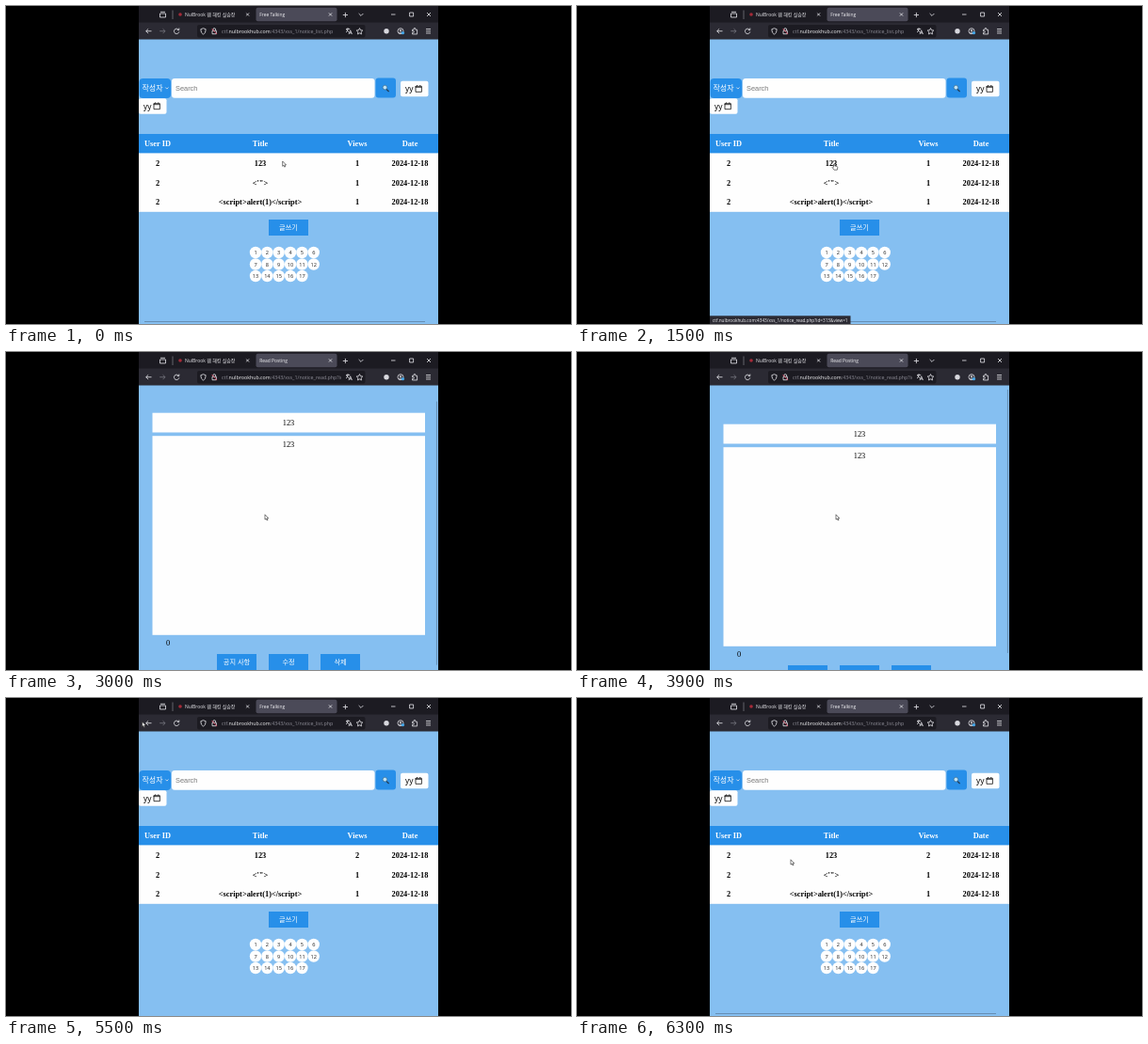
An HTML page that plays this animation: 600 by 338 pixels, repeating every 6400 ms.

```html
<!DOCTYPE html>
<html lang="ko">
<head>
<meta charset="utf-8">
<style>
html, body { margin: 0; width: 100%; height: 100%; overflow: hidden; background: #000; }
svg { display: block; width: 600px; height: 338px; }
text { font-family: 'Open Sans', 'Noto Sans CJK KR', 'Noto Sans CJK', sans-serif; white-space: pre; }
.serif { font-family: 'Liberation Serif', serif; font-size: 8.36px; }
.arial { font-family: 'Liberation Sans', sans-serif; }
.bold { font-weight: bold; }
.mid { text-anchor: middle; }
.line { fill: none; stroke: #e8e8ec; stroke-width: .8; }
</style>
</head>
<body>
<svg id="stage" viewBox="0 0 600 338"></svg>
<script>
const LOOP = 6400, STEP = 100;
const BLUE = '#278fe9', WHITE = '#fefefe';
const HOST = 'ctf.<tspan fill="#f4f4f6">nulbrookhub.com</tspan>:4343/xss_1/';

const rect = (x, y, w, h, fill, rx = 0) =>
  `<rect x="${x}" y="${y}" width="${w}" height="${h}" fill="${fill}" rx="${rx}"/>`;
const text = (x, y, str, size, fill = '#000', cls = '') =>
  `<text x="${x}" y="${y}" font-size="${size}" fill="${fill}" class="${cls}">${str}</text>`;
const line = (d, attrs = '') => `<path class="line" d="${d}" ${attrs}/>`;
const cross = (x, y, r) => line(`M${x - r} ${y - r}l${2 * r} ${2 * r}m0 ${-2 * r}l${-2 * r} ${2 * r}`);
const button = (x, y, label) =>
  rect(x, y, 42, 17, BLUE) + text(x + 21, y + 11.2, label, 7.2, WHITE, 'mid');
const dateBox = (x, y) =>
  rect(x, y, 29.5, 16.5, WHITE, 2) + text(x + 5, y + 11.3, 'yy', 8.4) +
  line(`M${x + 16} ${y + 5.5}h6.4v6h-6.4zv1h6.4M${x + 17.6} ${y + 4.2}v1.3m3.2-1.3v1.3`, 'style="stroke:#111"');

function listPage() {
  const columns = [161, 270, 373, 429];
  const row = (y, cells, fill = '#000') =>
    cells.map((c, i) => text(columns[i], y, c, 8.36, fill, 'serif bold mid')).join('');
  const day = '2024-12-18';
  let out = rect(141.5, 77, 33.5, 21, BLUE, 4) + text(144.5, 90.3, '작성자', 8, WHITE) +
    line('M169.3 86.5l1.6 1.6l1.6-1.6') +
    rect(176, 77, 215.5, 20.7, WHITE, 3) + text(180, 90.2, 'Search', 7.4, '#777', 'arial') +
    rect(392.5, 76.5, 21.5, 21, BLUE, 3) +
    line('M404 88.5l2.6 2.4', 'style="stroke:#23415c;stroke-width:1.4"') +
    '<circle cx="402.4" cy="86.6" r="2.3" fill="#bfe3f5" stroke="#3c6c8f" stroke-width=".7"/>' +
    dateBox(419, 79.8) + dateBox(141, 98.2) +
    rect(141, 136, 318, 20.5, BLUE) + rect(141, 156.5, 318, 62.3, WHITE) +
    row(149, ['User ID', 'Title', 'Views', 'Date'], WHITE) +
    row(169.9, ['2', '123', '<tspan id="views">1</tspan>', day]) +
    row(190.6, ['2', '&lt;\'"&gt;', '1', day]) +
    row(211.3, ['2', '&lt;script&gt;alert(1)&lt;/script&gt;', '1', day]) +
    button(279, 227, '글쓰기');
  for (let i = 0; i < 17; i++) {
    const x = 265 + i % 6 * 12.35, y = 262 + Math.floor(i / 6) * 12.5;
    out += `<circle cx="${x}" cy="${y}" r="6.2" fill="${WHITE}"/>` +
      text(x, y + 2, i + 1, 5.6, '#222', 'mid');
  }
  return out + `<g id="hbar">${rect(147, 335, 298, 1, '#668fb4')}</g>` +
    `<g id="status">${rect(141, 329.3, 149.5, 8.7, '#2b2a33')}` +
    text(144, 335.6, HOST + 'notice_read.php?id=313&amp;view=1', 4.7, '#f4f4f6') + '</g>';
}

function readPage() {
  return '<g id="content">' +
    rect(155.5, 76.7, 289.5, 20.8, WHITE) + text(300, 89.9, '123', 8.36, '#000', 'serif mid') +
    rect(155.5, 101.2, 289.5, 211.6, WHITE) + text(300, 113, '123', 8.36, '#000', 'serif mid') +
    text(172, 324, '0', 8.36, '#000', 'serif mid') +
    button(224, 333, '공지 사항') + button(279, 333, '수정') + button(334, 333, '삭제') +
    '</g>' + `<g id="vbar">${rect(456.9, 40, 1, 280, '#668fb4')}</g>`;
}

function browserBar() {
  const dim = 'style="stroke:#77767f"';
  return rect(141, 0, 318, 18, '#1c1b22') + rect(141, 17.5, 318, 18, '#2b2a33') +
    rect(265.5, 1.8, 86, 14.4, '#4b4a58', 2) + rect(203, 20, 178.5, 13.5, '#1c1b22', 2) +
    line('M163.5 8h6v4h-6zM164 6.3h5') + line('M177 4.5v9.5', dim) +
    '<circle cx="185" cy="9" r="1.8" fill="#a52a38"/>' +
    text(190, 11, 'NulBrook 웹 해킹 실습장', 5, '#e8e8ec') +
    '<text id="tab" x="269.3" y="11" font-size="4.9" fill="#f4f4f6"></text>' +
    cross(256.5, 9, 1.6) + cross(344.5, 9, 1.6) +
    line('M357.8 9.5h5.2M360.4 6.9v5.2M374.6 8l2.4 2.4l2.4-2.4M409 9h4.5M428.6 7h4v4h-4z') +
    cross(449, 9, 2) +
    line('M154.5 26.7h-5.8m2.4-2.4l-2.4 2.4l2.4 2.4') +
    line('M163.2 26.7h5.8m-2.4-2.4l2.4 2.4l-2.4 2.4', dim) +
    line('M183.3 25.2a2.7 2.7 0 1 0 .5 2.2M183.8 23.5v2h-2') +
    line('M209.5 23.7l2.7 1q0 4.2-2.7 5.5q-2.7-1.3-2.7-5.5z') +
    line('M219 26.3h4.4v3.4h-4.4zM219.8 26v-1a1.4 1.4 0 0 1 2.8 0v1') +
    line('M218.6 24l5.4 6', 'style="stroke:#e2455f"') +
    `<g clip-path="url(#field)">${text(229, 28.8, HOST + '<tspan id="file"></tspan>', 5.3, '#8f8e98')}</g>` +
    line('M361 24.4h4.2M363 23.2v1.2q0 2.6-2 3.6m.6-3q1 2 2.6 2.6M364 30l1.7-4.2l1.7 4.2m-.5-1.3h-2.4') +
    line('M375.5 23.6l1 2.1l2.3.3l-1.7 1.6l.4 2.3l-2-1.1l-2 1.1l.4-2.3l-1.7-1.6l2.3-.3z') +
    '<circle cx="404" cy="26.7" r="2.7" fill="#d8d8de"/>' +
    line('M416 26.7a3 3 0 1 1 6 0a3 3 0 1 1-6 0M417.2 28.9q1.8-2 3.6 0M418.2 26a.8.8 0 1 1 1.6 0a.8.8 0 1 1-1.6 0') +
    '<circle cx="421.4" cy="28.6" r="1.7" fill="#45a7e8"/>' +
    line('M431.5 25.2h1.6v-1a.8.8 0 0 1 1.7 0v1h1.8v4.7h-5.1v-1.6h1a.8.8 0 0 0 0-1.6h-1z') +
    line('M446 24.5h5M446 26.7h5M446 28.9h5');
}

document.getElementById('stage').innerHTML =
  '<clipPath id="window"><rect x="141" width="318" height="338"/></clipPath>' +
  '<clipPath id="field"><rect x="229" y="20" width="127" height="14"/></clipPath>' +
  rect(0, 0, 600, 338, '#000') +
  '<g clip-path="url(#window)">' + rect(141, 35, 318, 303, '#85bff1') +
  `<g id="list">${listPage()}</g><g id="read">${readPage()}</g>${browserBar()}</g>` +
  `<g id="cursor" fill="#fff" stroke="#222" stroke-width=".6" stroke-linejoin="round">
    <path id="arrow" d="M0 0v5.3l1.2-1l.8 1.8l1-.4l-.8-1.8h1.6z"/>
    <path id="hand" d="M-.7 3.6V.4q.7-.9 1.3 0v2l2.4.6q.6.3.5 1l-.5 2.6h-3.2l-2-2.6q.3-.9 1.5-.4z"/></g>`;

const el = {};
document.querySelectorAll('[id]').forEach(node => el[node.id] = node);
const show = (node, on) => node.style.display = on ? '' : 'none';

// Pointer moves: start, end, from x, y, to x, y
const moves = [
  [200, 1200, 293.7, 165, 273.3, 167.6],
  [1600, 1900, 273.3, 167.6, 273.7, 162],
  [2400, 2600, 273.7, 162, 275, 172.8],
  [4100, 4600, 275, 172.8, 144.6, 25.2],
  [5500, 6100, 144.6, 25.2, 227, 171.8],
];
const progress = (t, from, to) => Math.min(1, Math.max(0, (t - from) / (to - from)));
const smooth = p => p * p * (3 - 2 * p);

function pointer(t) {
  const [start, end, x0, y0, x1, y1] = moves.filter(m => t >= m[0]).pop() || moves[0];
  const p = smooth(progress(t, start, end));
  return [x0 + (x1 - x0) * p, y0 + (y1 - y0) * p];
}

function draw(t) {
  const reading = t >= 1700 && t < 5500;
  const hovering = t >= 1000 && t < 1700;
  const scroll = t < 3900 ? 12 * smooth(progress(t, 2700, 3000)) : 0;
  show(el.list, !reading);
  show(el.read, reading);
  show(el.status, hovering);
  show(el.hbar, t !== 5500);
  show(el.hand, hovering);
  show(el.arrow, !hovering);
  el.tab.textContent = reading ? 'Read Posting' : 'Free Talking';
  el.file.textContent = reading ? 'notice_read.php?id=313&view=1' : 'notice_list.php';
  el.views.textContent = t < 5500 ? 1 : 2;
  el.content.setAttribute('transform', `translate(0 ${-scroll})`);
  el.vbar.setAttribute('transform', `translate(0 ${scroll * 1.05})`);
  el.cursor.setAttribute('transform', `translate(${pointer(t)})`);
}

const origin = performance.now();
function tick() {
  const t = (performance.now() - origin) % LOOP;
  draw(Math.floor(t / STEP) * STEP);
  requestAnimationFrame(tick);
}
tick();
</script>
</body>
</html>
```
